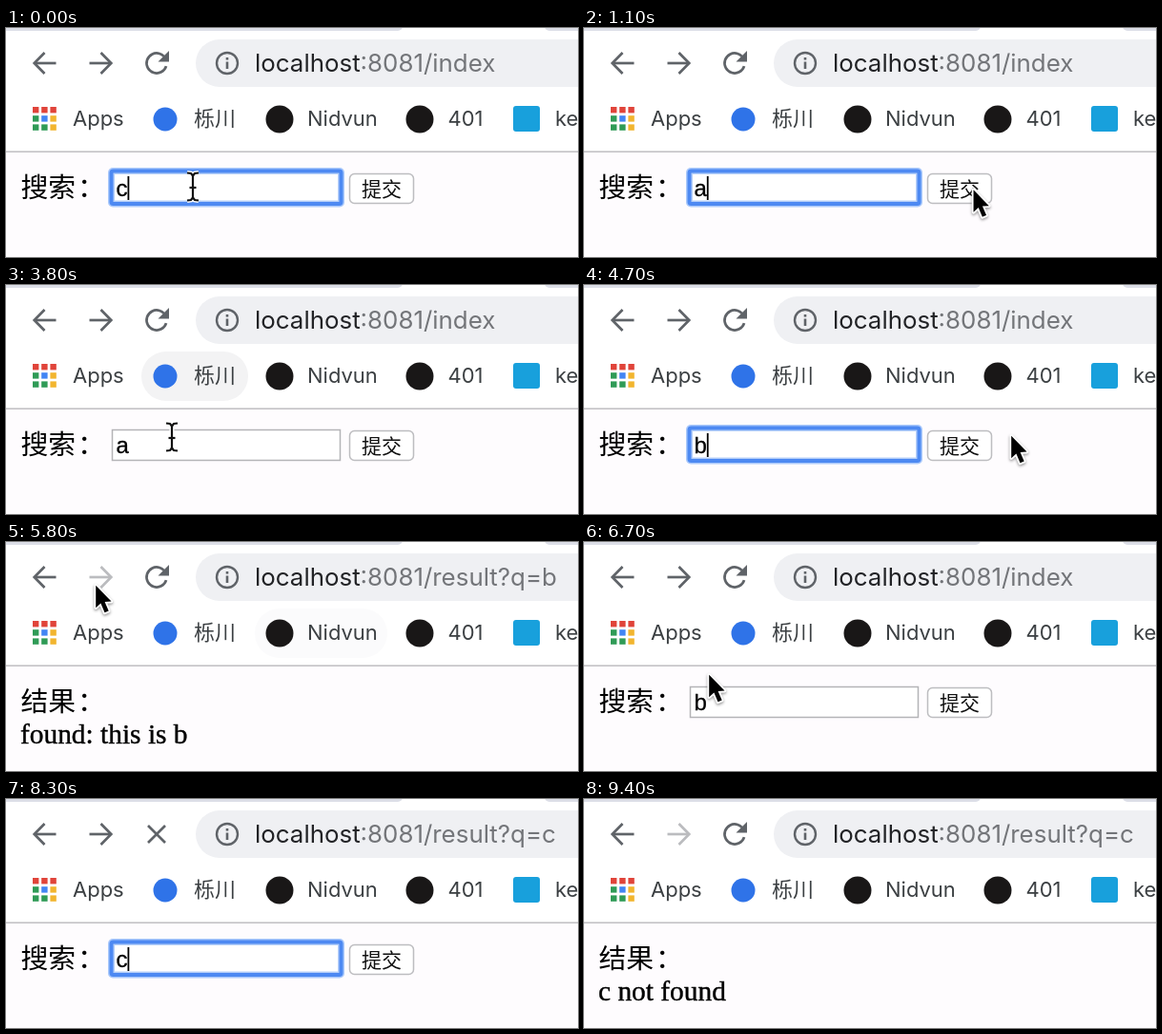
An HTML page with a canvas for the animation above (9500 ms loop, 600 by 241 pixels).

```html
<!DOCTYPE html>
<html lang="zh">
<head>
<meta charset="utf-8">
<title>Search form</title>
<style>
html, body { margin: 0; width: 100%; height: 100%; overflow: hidden; background: #fff; }
canvas { display: block; }
</style>
</head>
<body>
<canvas id="stage" width="600" height="241"></canvas>
<script>
const ctx = document.getElementById('stage').getContext('2d');
const LOOP = 9500, STEP = 100;
const UI = 'Inter, "Noto Sans CJK SC", "Noto Sans CJK", sans-serif';
const SERIF = '29.4px "Liberation Serif", "Noto Sans CJK SC", "Noto Sans CJK", serif';
const HEADING = '28.8px "Noto Sans CJK SC", "Noto Sans CJK", serif';
const FIELD = '24px "Liberation Sans", sans-serif';
const ICON = '#5f6368';

// Each track holds [start time, value]; values change hard.
const urls = [[0, ''], [1300, 'a'], [2900, ''], [5100, 'b'], [6300, ''], [8200, 'c']];
const pages = [[0, ''], [1800, 'a'], [3100, ''], [5300, 'b'], [6700, ''], [8900, 'c']];
const inputs = [[0, 'c'], [600, 'a'], [4300, 'b'], [7800, 'c']];
const focus = [[0, true], [1800, false], [4000, true], [5300, false], [7100, true], [8900, false]];
const selected = [[0, false], [400, true], [600, false], [4100, true], [4300, false], [7200, true], [7800, false]];
const pointerShown = [[0, true], [600, false], [800, true], [4300, false], [4500, true], [7400, false]];
const results = { a: 'found: this is a', b: 'found: this is b', c: 'c not found' };

const pointerPath = [
  [0, 196, 167], [300, 140, 168], [700, 140, 168], [1000, 405, 170], [1400, 420, 167],
  [1800, 420, 167], [2000, 470, 209], [2200, 472, 204], [2700, 60, 40], [2800, 42, 32],
  [3500, 42, 32], [3700, 195, 96], [3800, 174, 160], [4000, 132, 168], [4400, 132, 168],
  [4700, 447, 158], [4900, 405, 166], [5400, 410, 165], [5600, 335, 92], [5700, 190, 62],
  [5800, 93, 45], [6000, 44, 34], [6200, 44, 34], [6400, 130, 139], [6700, 130, 139],
  [7000, 150, 168], [7200, 130, 168], [9500, 130, 168]
];

const bookmarks = [
  { x: 16, w: 119, label: 'Apps', textX: 70 },
  { x: 142, w: 112, label: '栎川', textX: 197, color: '#2f73e8', iconX: 167 },
  { x: 261, w: 139, label: 'Nidvun', textX: 316, color: '#191717', iconX: 287 },
  { x: 408, w: 105, label: '401', textX: 463.5, color: '#191717', iconX: 434 },
  { x: 521, w: 110, label: 'kelumo', textX: 576, color: '#18a0dc', iconX: 546, square: true }
];

function at(track, t) {
  let value;
  for (const [start, v] of track) if (t >= start) value = v;
  return value;
}

function pointerAt(t) {
  const i = Math.max(1, pointerPath.findIndex(p => p[0] >= t));
  const [t0, x0, y0] = pointerPath[i - 1], [t1, x1, y1] = pointerPath[i];
  const u = Math.max(0, (t - t0) / (t1 - t0)), e = u * u * (3 - 2 * u);
  return { x: x0 + (x1 - x0) * e, y: y0 + (y1 - y0) * e };
}

function inside(p, x, y, w, h) {
  return p.x >= x && p.x <= x + w && p.y >= y && p.y <= y + h;
}

function rect(x, y, w, h, color) {
  ctx.fillStyle = color;
  ctx.fillRect(x, y, w, h);
}

function rounded(x, y, w, h, r, fill, stroke, width = 1) {
  ctx.beginPath();
  ctx.roundRect(x, y, w, h, r);
  if (fill) { ctx.fillStyle = fill; ctx.fill(); }
  if (stroke) { ctx.strokeStyle = stroke; ctx.lineWidth = width; ctx.stroke(); }
}

function disc(x, y, r, color) {
  ctx.fillStyle = color;
  ctx.beginPath();
  ctx.arc(x, y, r, 0, Math.PI * 2);
  ctx.fill();
}

// Weight adds a fine outline, like heavier font smoothing.
function text(s, x, y, font, color, weight = 0) {
  ctx.font = font;
  ctx.fillStyle = color;
  ctx.fillText(s, x, y);
  if (weight) {
    ctx.strokeStyle = color;
    ctx.lineWidth = weight;
    ctx.strokeText(s, x, y);
  }
  return x + ctx.measureText(s).width;
}

function line(points, color, width) {
  ctx.strokeStyle = color;
  ctx.lineWidth = width;
  ctx.beginPath();
  points.forEach(([x, y], i) => i ? ctx.lineTo(x, y) : ctx.moveTo(x, y));
  ctx.stroke();
}

function arrowIcon(x, dir, color) {
  line([[x - 12 * dir, 37], [x + 10 * dir, 37]], color, 2.7);
  line([[x, 26], [x + 10.8 * dir, 37], [x, 48]], color, 2.7);
}

function reloadIcon() {
  ctx.strokeStyle = ICON;
  ctx.lineWidth = 2.7;
  ctx.beginPath();
  ctx.arc(158, 37, 10.5, 0.3, Math.PI * 1.76);
  ctx.stroke();
  ctx.fillStyle = ICON;
  ctx.beginPath();
  ctx.moveTo(171, 24);
  ctx.lineTo(171, 35.5);
  ctx.lineTo(159.5, 35.5);
  ctx.fill();
}

function stopIcon() {
  line([[149, 28], [167, 46]], ICON, 2.7);
  line([[167, 28], [149, 46]], ICON, 2.7);
}

function toolbar(t, query, page) {
  rect(0, 0, 600, 130, '#fff');
  rounded(-10, -8, 426, 11, 5, '#dcdee7');
  rounded(565, -8, 60, 11, 5, '#dcdee7');

  if (inside(pointerAt(t), 19, 14, 44, 46)) disc(40, 37, 23, '#ebecee');
  arrowIcon(40.5, -1, ICON);
  arrowIcon(99.5, 1, page ? '#bbbcbf' : ICON);
  query === page ? reloadIcon() : stopIcon();

  rounded(199, 12, 460, 50, 25, '#eff0f3');
  ctx.strokeStyle = ICON;
  ctx.lineWidth = 2.4;
  ctx.beginPath();
  ctx.arc(232, 37, 11, 0, Math.PI * 2);
  ctx.stroke();
  rect(230.7, 35.5, 2.6, 7.5, ICON);
  rect(230.7, 31, 2.6, 2.6, ICON);
  const font = '25.9px ' + UI;
  const end = text('localhost', 261, 46, font, '#222326');
  text(':8081/' + (query ? 'result?q=' + query : 'index'), end, 46, font, '#737579');
}

function bookmarkBar(t) {
  const recent = pointerAt(Math.max(0, t - 100)), older = pointerAt(Math.max(0, t - 200));
  for (const b of bookmarks) {
    const over = p => inside(p, b.x, 70, b.w, 52);
    if (over(recent)) rounded(b.x, 70, b.w, 52, 26, '#f3f3f4');
    else if (over(older)) rounded(b.x, 70, b.w, 52, 26, '#fbfbfc');
    if (b.square) rounded(b.iconX - 14, 82, 28, 27, 3, b.color);
    else if (b.color) disc(b.iconX, 96, b.label === '栎川' ? 12.5 : 14.5, b.color);
    text(b.label, b.textX, 103.3, '22px ' + UI, '#3c4043');
  }
  const red = '#e0443a', green = '#2f9b56', blue = '#4285f4', yellow = '#f2b52e';
  [red, red, red, green, blue, yellow, green, green, yellow].forEach((color, i) =>
    rect(28 + i % 3 * 9.2, 83 + Math.floor(i / 3) * 9.2, 6.4, 6.4, color));
  rect(0, 129.5, 600, 1.3, '#b5b5b8');
}

function heading(label) {
  const end = text(label, 15.5, 178.3, HEADING, '#000');
  text('：', end + 2, 178.3, HEADING, '#000');
}

function searchForm(t) {
  heading('搜索');
  const value = at(inputs, t), focused = at(focus, t);
  if (focused) {
    rounded(107, 147, 248, 41.5, 5, '#a9c8fb');
    rounded(108.5, 148.5, 245, 38.5, 4, '#4d89f2');
    rect(112.5, 152.5, 237, 30.5, '#b5cff9');
    rect(114, 154, 234, 27.5, '#fff');
  } else {
    rounded(111.5, 152.5, 239, 32, 0, '#fff', '#b4b4b7', 1.5);
  }
  ctx.font = FIELD;
  const width = ctx.measureText(value).width;
  if (focused && at(selected, t)) rect(115.5, 154.5, width + 0.5, 26.5, '#b4d5fb');
  const end = text(value, 115.5, 177, FIELD, '#000', 0.3);
  if (focused && !at(selected, t)) rect(end, 156, 1.8, 25, '#000');

  rounded(360.5, 153.5, 67, 31, 5, '#fff', '#bdbdc0', 1.5);
  text('提交', 373, 177, '21px ' + UI, '#111');
}

function beam({ x, y }) {
  for (const [color, width] of [['#fff', 5], ['#111', 2.2]]) {
    line([[x, y - 12], [x, y + 12]], color, width);
    for (const s of [-1, 1])
      line([[x - 6, y + 14.5 * s], [x - 2, y + 14 * s], [x, y + 11.5 * s],
        [x + 2, y + 14 * s], [x + 6, y + 14.5 * s]], color, width);
    line([[x - 3.5, y + 1], [x + 3.5, y + 1]], color, width);
  }
}

function arrow({ x, y }) {
  const shape = [[0, 0], [0, 23.5], [5.2, 18.7], [9.3, 28.5], [13.5, 26.7], [9.4, 17.2], [16.3, 16.8]];
  ctx.save();
  ctx.translate(x + 1.2, y + 0.8);
  ctx.beginPath();
  for (const [dx, dy] of shape) ctx.lineTo(dx, dy);
  ctx.closePath();
  ctx.strokeStyle = '#fff';
  ctx.lineWidth = 3.6;
  ctx.lineJoin = 'round';
  ctx.shadowColor = 'rgba(0, 0, 0, 0.4)';
  ctx.shadowBlur = 3;
  ctx.shadowOffsetY = 1.5;
  ctx.stroke();
  ctx.shadowColor = 'transparent';
  ctx.fillStyle = '#000';
  ctx.fill();
  ctx.restore();
}

function draw(t) {
  const page = at(pages, t), pointer = pointerAt(t);
  rect(0, 0, 600, 241, '#fefcfe');
  toolbar(t, at(urls, t), page);
  bookmarkBar(t);
  if (page) {
    heading('结果');
    text(results[page], 15, 212, SERIF, '#000', 0.4);
  } else {
    searchForm(t);
  }
  if (at(pointerShown, t)) {
    const overField = !page && inside(pointer, 110, 151, 242, 35);
    (overField ? beam : arrow)(pointer);
  }
}

const begin = performance.now();
function tick() {
  const elapsed = Math.max(0, performance.now() - begin) % LOOP;
  draw(Math.floor(elapsed / STEP) * STEP);
  requestAnimationFrame(tick);
}
tick();
</script>
</body>
</html>
```
